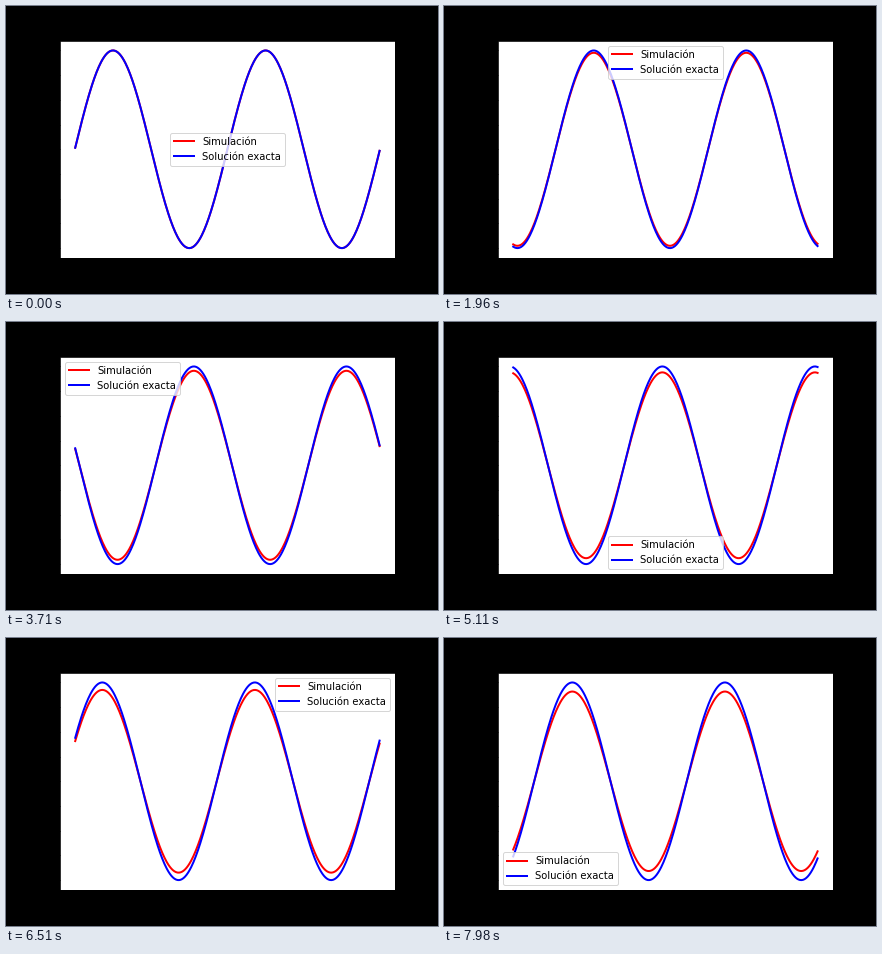
A matplotlib script that plays this animation: 432 px wide and 288 px high, repeating every 8000 ms.

```python
import numpy as np
import matplotlib.pyplot as plt
from matplotlib.animation import FuncAnimation

LOOP_MS = 8000
FRAMES = 115
CELLS = 400
SHIFT = 0.01       # wave periods travelled per step
DECAY = 8.45e-4    # numerical damping per step

x = (np.arange(CELLS) + 0.5) / CELLS * 2


def wave(step):
    return np.sin(2 * np.pi * (x - SHIFT * step))


fig = plt.figure(figsize=(6, 4), dpi=72, facecolor="black")
ax = fig.add_axes([0.125, 0.125, 0.775, 0.755])
sim, = ax.plot(x, wave(0), color="red", lw=2, label="Simulación")
exact, = ax.plot(x, wave(0), color="blue", lw=2, label="Solución exacta")
ax.set_xlim(ax.get_xlim())
ax.set_ylim(-1.1, 1.1)
ax.legend(loc="best", fontsize=10)


def update(step):
    y = wave(step)
    sim.set_ydata(y * np.exp(-DECAY * step))
    exact.set_ydata(y)
    return sim, exact


anim = FuncAnimation(fig, update, frames=FRAMES, init_func=lambda: update(0),
                     interval=LOOP_MS / FRAMES, repeat=True, repeat_delay=0)
plt.show()
```
